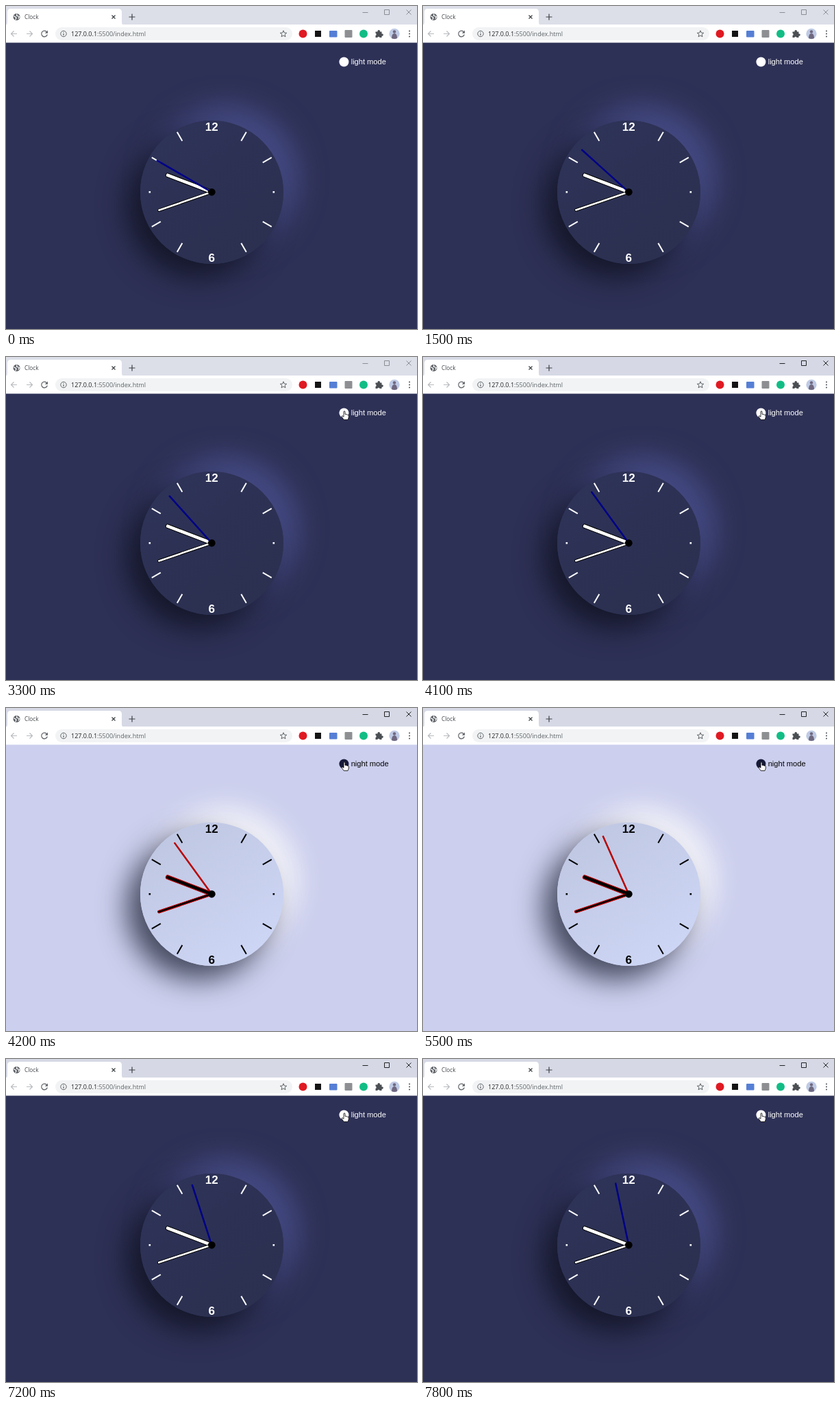
Recreate the animation shown at these times as an HTML page. Size 600 by 471 pixels, loop 8 s.

```html
<!DOCTYPE html>
<html lang="en">
<head>
<meta charset="utf-8">
<title>Clock</title>
<style>
  html, body { margin: 0; width: 100%; height: 100%; overflow: hidden; }
  body {
    --page: #2e3156; --ink: #fff; --toggle: #fff; --edge: #000; --second: #000087;
    --face: linear-gradient(145deg, #2e3359, #2b304f);
    --glow: #474d88; --shade: #15172a;
    --strip: #dcdfe8; --control: #8b8d93;
    position: relative; background: var(--page);
  }
  body.light {
    --page: #cccfed; --ink: #000; --toggle: #171a38; --edge: #d00000; --second: #b80000;
    --face: linear-gradient(145deg, #bdc5df, #cfd8f8);
    --glow: #f6f6fb; --shade: #454a60;
  }
  body.active { --strip: #d6d9e5; --control: #222; }
  #face {
    position: absolute; left: 196px; top: 167px; width: 209px; height: 209px;
    border-radius: 50%; background: var(--face);
    box-shadow: -20px 20px 40px var(--shade), 20px -20px 40px var(--glow);
  }
  svg { position: absolute; left: 0; top: 0; display: block; }
  .ui { font-family: "Open Sans", sans-serif; }
  .page { font-family: "Liberation Sans", Arial, sans-serif; fill: var(--ink); }
  .number { font-size: 17px; font-weight: bold; text-anchor: middle; }
  .line { fill: none; stroke: #5f6368; stroke-width: 1.2; }
  .control { fill: none; stroke: var(--control); stroke-width: 1; }
  .tick { stroke: var(--ink); stroke-width: 2; }
  .hand { fill: var(--ink); stroke: var(--edge); stroke-width: 1; }
</style>
</head>
<body>
<div id="face"></div>
<svg width="600" height="471" viewBox="0 0 600 471">
  <!-- Browser window -->
  <g class="ui">
    <rect width="600" height="28" style="fill:var(--strip)"/>
    <path d="M0 28Q2 27 2 24V9Q2 4 7 4H164Q169 4 169 9V24Q169 27 172 28Z" fill="#fff"/>
    <rect y="27" width="600" height="26.5" fill="#fff"/>
    <circle cx="15.5" cy="16" r="5" fill="#5f6368"/>
    <path d="M11.5 14.5L15 17L14 20M16 11.5L15.5 14L19.5 15.5L18 18.5" fill="none" stroke="#fff" stroke-width="1.3"/>
    <text x="27" y="19" font-size="8.3" fill="#45484d">Clock</text>
    <path class="line" d="M154.5 13.5l5 5m0-5l-5 5" style="stroke:#3c4043"/>
    <path class="line" d="M179.5 16h9m-4.5-4.5v9" style="stroke:#3c4043"/>
    <path class="control" d="M520.5 9.5h8M552.5 5.5h7v7h-7zM584.5 5.5l7 7m0-7l-7 7"/>

    <g class="line">
      <path d="M16 40.5H7.5m4-4l-4 4l4 4M30 40.5h8.5m-4-4l4 4l-4 4" stroke="#b9bbbf"/>
      <path d="M59.6 38A4.3 4.3 0 1 0 60.3 41.5"/>
    </g>
    <path d="M61 35.5v4.2h-4.2z" fill="#5f6368"/>
    <rect x="72" y="31" width="346" height="19" rx="9.5" fill="#f1f3f4"/>
    <circle class="line" cx="84" cy="40.5" r="4.2" style="stroke-width:1"/>
    <path class="line" d="M84 40v3m0-5v1"/>
    <text x="95" y="44" font-size="9" fill="#5f6368"><tspan fill="#202124">127.0.0.1</tspan>:5500/index.html</text>
    <path id="star" class="line" style="stroke-width:1"/>
    <circle cx="433.5" cy="40.5" r="6" fill="#e01a22"/>
    <rect x="451" y="36" width="9" height="9" fill="#151515"/>
    <rect x="472" y="36" width="11.5" height="9.5" rx="1" fill="#557fd5"/>
    <rect x="494.5" y="35" width="11" height="11" rx="1" fill="#8d8f92"/>
    <circle cx="522" cy="40.5" r="6" fill="#12bd85"/>
    <path d="M539.5 37.5h3a1.8 1.8 0 1 1 3.4 0h2.6v3a1.7 1.7 0 1 1 0 3.2v2.3h-3a1.7 1.7 0 0 0-3.2 0h-2.8v-3a1.7 1.7 0 0 0 0-3.2z" fill="#4b4f54"/>
    <circle cx="567" cy="40.5" r="7.7" fill="#bfcbe5"/>
    <path d="M563 47q0-7 4-7t4 7q-4 2-8 0z" fill="#6f6980"/>
    <circle cx="567" cy="37.5" r="2.2" fill="#6f6980"/>
    <path d="M589 36.5v.01m0 4v.01m0 4v.01" stroke="#4b4f54" stroke-width="2" stroke-linecap="round"/>
  </g>

  <!-- Page -->
  <g class="page">
    <circle cx="493.4" cy="81.5" r="7" style="fill:var(--toggle)"/>
    <text id="mode" x="503.7" y="85" font-size="11.1"></text>
    <g transform="translate(300.3 271.3)">
      <g id="ticks"></g>
      <text class="number" y="-89.2">12</text>
      <text class="number" y="101.8">6</text>
      <rect id="hour" class="hand" x="-2.8" y="-71.5" width="5.6" height="71.5" rx="2.5"/>
      <rect id="minute" class="hand" x="-1.8" y="-83" width="3.6" height="83" rx="1.6"/>
      <rect id="second" x="-1.25" y="-93" width="2.5" height="93" rx="1" style="fill:var(--second)"/>
      <circle r="5.4" fill="#000"/>
    </g>
  </g>

  <g id="cursor" fill="#fff" stroke="#000" stroke-width=".8" stroke-linejoin="round">
    <path id="arrow" d="M0 0V11.5L2.7 9L4.5 13L6.3 12.2L4.6 8.3H8.2Z"/>
    <path id="pointer" d="M-1 1Q0 -.3 1 1V5Q2.1 4.3 2.9 5.4Q4 4.8 4.7 5.9Q6.3 5.5 6.3 7.3V9.5L5 13H-.8L-3.8 8.8Q-4.4 7.4-3 7.2L-1 8.8Z"/>
  </g>
</svg>
<script>
const $ = id => document.getElementById(id);
const LOOP = 8000;

$('star').setAttribute('d', 'M' + Array.from({ length: 10 }, (_, i) => {
  const r = i % 2 ? 2.2 : 5, a = i * Math.PI / 5;
  return [405 + r * Math.sin(a), 40.8 - r * Math.cos(a)];
}).join('L') + 'Z');

$('ticks').innerHTML = Array.from({ length: 12 }, (_, i) => {
  if (i % 6 === 0) return '';
  const mark = i % 3 ? '<path class="tick" d="M0 -101V-86"/>'
                     : '<rect x="-1.3" y="-91.8" width="2.6" height="2.6"/>';
  return `<g transform="rotate(${i * 30})">${mark}</g>`;
}).join('');

const turn = (id, degrees) => $(id).setAttribute('transform', `rotate(${degrees})`);
const show = (id, visible) => $(id).style.display = visible ? '' : 'none';

function render(t) {
  const light = t >= 4200 && t < 7200;
  document.body.classList.toggle('light', light);
  document.body.classList.toggle('active', t >= 4000);
  $('mode').textContent = light ? 'night mode' : 'light mode';

  const seconds = 50 + Math.floor((t + 500) / 1000);
  const minutes = 41 + seconds / 60;
  turn('second', seconds * 6);
  turn('minute', minutes * 6);
  turn('hour', 270 + minutes / 2);

  // The mouse glides up to the switch, then settles slightly higher.
  const p = Math.min(1, Math.max(0, (t - 1800) / 800));
  const away = (1 - p) ** 2;
  const x = 494 + 36 * away;
  const y = (t < 2800 ? 82.5 : 78.5) + 260 * away;
  $('cursor').setAttribute('transform', `translate(${x} ${y})`);
  show('cursor', t >= 1900);
  const hovering = y < 90;
  show('arrow', !hovering);
  show('pointer', hovering);
}

const start = performance.now();
function frame() {
  render((performance.now() - start) % LOOP);
  requestAnimationFrame(frame);
}
frame();
</script>
</body>
</html>
```
